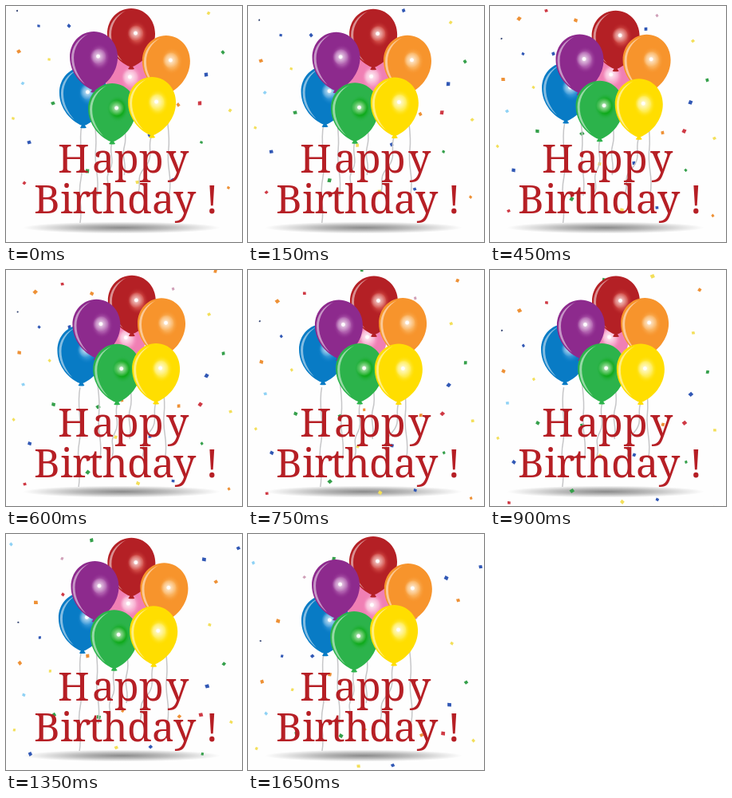
Animation, 296 px wide and 296 px high, one loop 1.8 s. Source, as an HTML page:

```html
<!DOCTYPE html>
<html lang="en">
<head>
<meta charset="utf-8">
<title>Happy Birthday!</title>
<style>
html, body { margin: 0; width: 100%; height: 100%; overflow: hidden; background: #fefefe; }
svg { display: block; width: 100%; height: 100%; }
text { font: 50px "Noto Serif", serif; fill: #b61f25; }
</style>
</head>
<body>
<svg viewBox="0 0 296 296">
  <defs id="defs">
    <radialGradient id="floor">
      <stop offset="0" stop-color="#8b8b8b"/>
      <stop offset=".45" stop-color="#b9b9b9"/>
      <stop offset=".8" stop-color="#e6e6e6"/>
      <stop offset="1" stop-color="#fefefe"/>
    </radialGradient>
    <radialGradient id="spot">
      <stop offset="0" stop-color="#fff"/>
      <stop offset=".2" stop-color="#fff" stop-opacity=".95"/>
      <stop offset=".3" stop-color="#fff" stop-opacity=".55"/>
      <stop offset="1" stop-color="#fff" stop-opacity="0"/>
    </radialGradient>
    <path id="body" d="M0-37C17-37 30-23 30-5C30 15 15 31 2 36L4 39Q0 40-4 39L-2 36C-15 31-30 15-30-5C-30-23-17-37 0-37Z"/>
    <path id="rim" d="M-7-34C-20-29-28-17-28-4C-28 11-20 22-11 29C-19 20-25 9-25-4C-25-17-18-28-7-34Z"/>
  </defs>
  <ellipse cx="145" cy="278" rx="124" ry="7.5" fill="url(#floor)"/>
  <g id="confetti"></g>
  <g id="strings" fill="none" stroke="#c6c6c8" stroke-width="1.5"></g>
  <g id="balloons"></g>
  <text x="65 108 136 167 201" y="209">Happy</text>
  <text x="35 68 83 104 121 152 183 210 250" y="260">Birthday!</text>
</svg>
<script>
const LOOP = 1800, STEP = 150, FALL = 11.65;

// x, y, sway x, sway y, colour, glow; back to front
const balloons = [
  [150, 95, -6, -5, "#f07fb4", "#f9b3d3"],
  [157, 40, 1, 4.5, "#b42025", "#d9574f"],
  [201, 74, -7, -2, "#f7942c", "#fbb765"],
  [97, 114, -3, -9.5, "#087bc5", "#3b9bdb"],
  [110, 69, 4, 5.5, "#8d2a8d", "#b769b5"],
  [133, 134, 7.3, -5, "#2cb34b", "#07a70d"],
  [183, 126, 6, 3.5, "#ffde00", "#fff06a"]
];

// top x, top y, end x, end y, sway x, sway y
const strings = [
  [95, 150, 93, 272, -2.5, -3],
  [111, 106, 114, 238, 5, 3],
  [133, 171, 127, 234, 8, -4],
  [149, 130, 148, 212, 9, -4],
  [182, 164, 166, 234, 7, 3],
  [203, 111, 205, 236, -7, -2]
];

const paint = {
  b: "#3158b5", n: "#30406f", l: "#8fd2f5", y: "#f3df5a", o: "#ee9136",
  g: "#35a04b", r: "#cf3a45", m: "#d0a0b8"
};

// x, starting y, colour
const confetti = [
  [41, 25, "b"], [79, 25, "b"], [14, 6, "n"], [254, 9, "y"], [16, 57, "o"],
  [54, 67, "y"], [272, 58, "g"], [251, 86, "b"], [21, 97, "l"], [59, 122, "g"],
  [9, 141, "y"], [216, 124, "o"], [243, 122, "r"], [281, 131, "y"], [29, 171, "b"],
  [245, 171, "g"], [180, 162, "b"], [102, 207, "g"], [23, 222, "r"], [165, 221, "y"],
  [279, 228, "o"], [195, -6, "b"], [36, -19, "o"], [70, -29, "r"], [107, -17, "o"],
  [209, -23, "m"], [262, -45, "o"], [203, -62, "y"], [142, -58, "g"], [106, -97, "g"],
  [69, -74, "m"], [290, -87, "b"], [247, -73, "b"], [5, -92, "l"], [101, 48, "o"],
  [145, 117, "o"], [137, 163, "y"], [115, 125, "g"], [209, 218, "b"]
];

const $ = id => document.getElementById(id);

function add(parent, tag, attrs) {
  const el = document.createElementNS("http://www.w3.org/2000/svg", tag);
  for (const key in attrs) el.setAttribute(key, attrs[key]);
  return parent.appendChild(el);
}

const bits = confetti.map(([, , c], i) => {
  const s = c === "n" ? 1 : 1.7 + (i * 7 % 5) * .18;
  return add($("confetti"), "path", { d: `M${-s} ${-s}L${s} ${-s * .8}L${s * .9} ${s}L${-s} ${s * .8}Z`, fill: paint[c] });
});

const lines = strings.map(() => add($("strings"), "path", {}));

const shapes = balloons.map(([, , , , color, glow], i) => {
  const grad = add($("defs"), "radialGradient", { id: "glow" + i });
  add(grad, "stop", { offset: 0, "stop-color": glow });
  add(grad, "stop", { offset: .55, "stop-color": glow, "stop-opacity": .75 });
  add(grad, "stop", { offset: 1, "stop-color": color, "stop-opacity": 0 });
  const g = add($("balloons"), "g", {});
  add(g, "use", { href: "#body", fill: color });
  add(g, "use", { href: "#rim", fill: "#fff", "fill-opacity": .5 });
  add(g, "ellipse", { cx: 7, cy: -5, rx: 14, ry: 17, fill: `url(#glow${i})` });
  add(g, "circle", { cx: 5.5, cy: -6, r: 10, fill: "url(#spot)" });
  return g;
});

function draw(ms) {
  const step = Math.floor((ms % LOOP) / STEP);
  const sway = (1 - Math.cos((step + .5) * STEP / LOOP * 2 * Math.PI)) / 2;

  balloons.forEach(([x, y, dx, dy], i) =>
    shapes[i].setAttribute("transform", `translate(${x + dx * sway} ${y + dy * sway})`));

  strings.forEach(([x0, y0, x1, y1, dx, dy], i) => {
    const ax = x0 + dx * sway, ay = y0 + dy * sway, ex = x1 + dx * sway * .9;
    const h = y1 - ay, at = f => ay + h * f;
    lines[i].setAttribute("d",
      `M${ax} ${ay}C${ax - 5} ${at(.2)} ${ax + 4} ${at(.35)} ${(ax + ex) / 2} ${at(.55)}S${ex + 4} ${at(.8)} ${ex} ${y1}`);
  });

  confetti.forEach(([x, y], i) =>
    bits[i].setAttribute("transform",
      `translate(${x + step * .15} ${y + step * FALL}) rotate(${i * 37 + step * 9})`));
}

let start;
function tick(now) {
  start ??= now;
  draw(now - start);
  requestAnimationFrame(tick);
}
draw(0);
requestAnimationFrame(tick);
</script>
</body>
</html>
```
